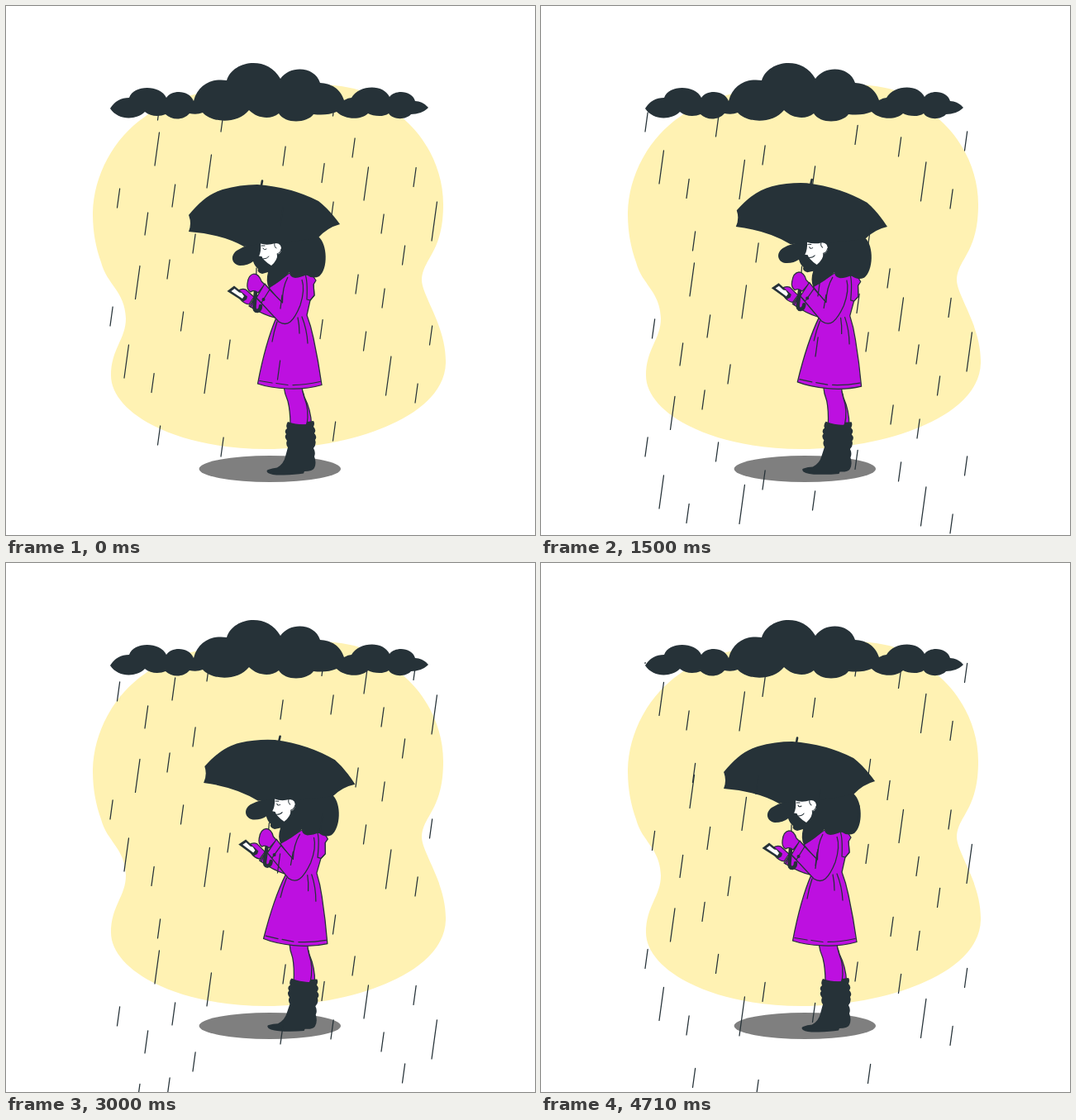
Write an HTML page that moves like this. It is 640 by 640 pixels and loops after 4780 ms.

```html
<!DOCTYPE html>
<html lang="en">
<head>
<meta charset="utf-8">
<title>Rainy day</title>
<style>
  html, body { margin: 0; width: 100%; height: 100%; overflow: hidden; background: #fff; }
  svg { display: block; width: 100vw; height: 100vh; }
  .ink { fill: #263238; }
  .line { fill: none; stroke: #263238; stroke-width: 1.25; stroke-linecap: round; stroke-linejoin: round; }
  .coat { fill: #bd10e0; stroke: #263238; stroke-width: 1.25; stroke-linejoin: round; }
  .skin { fill: #fff; }
</style>
</head>
<body>
<svg viewBox="0 0 640 640">
  <defs>
    <clipPath id="sky"><rect y="120" width="640" height="520"/></clipPath>
    <path id="drops" class="line"/>
  </defs>

  <path fill="#fff2b3" d="M105 250C106 205 130 160 168 134C200 108 250 101 300 97C350 92 400 93 428 102C450 110 466 122 478 134C510 160 529 200 529 240C529 300 503 306 503 332C504 352 533 388 532 432C530 500 410 536 315 536C205 536 127 492 127 447C127 415 145 403 145 378C144 345 122 337 115 310C108 290 105 272 105 250Z"/>
  <ellipse cx="319.300" cy="560" rx="85.700" ry="16" fill="#7f7f7f"/>

  <g id="walker">
    <!-- legs and boots -->
    <path class="coat" d="M354 458Q359 464 361 473Q369 489 369.500 506L358 506Z"/>
    <path class="coat" d="M336 460Q337 469 341 478Q344 490 344 507L364 507Q367 488 361 474Q358 466 358 459Z"/>
    <path class="ink" d="M341 503Q353 507 363 506L364 503L372 502Q374 505 372 509Q376 513 373 517Q377 521 374 525Q376 530 372 535Q375 540 373 545Q376 553 373 559Q371 563 361 563L360 565.500Q350 567 336 567.500Q322 568 317 565Q314 562 317 561Q322 559 328 558.500Q336 554 338 545L341 534Q338 530 340 526Q336 521 339 518Q336 514 340 511Q338 507 341 503Z"/>

    <!-- far arm and phone -->
    <path class="coat" d="M303 350L331 366L325 377Q312 374 294 363Z"/>
    <path class="line" d="M300 355L296 364"/>
    <path class="coat" d="M280 345Q285 341 290 343L300 352L294 361Q287 360 283 354L287 349Z"/>
    <path class="ink" d="M267.500 345L276 338.500L292 351.500L291 355L287 357.500Z"/>
    <path class="skin" d="M272.500 345L276.500 342L282 346.500L285 347L288 351L286 354Z"/>
    <path class="line" stroke-width="3" d="M303 317Q303 326 302 330"/>

    <!-- coat -->
    <path class="coat" d="M343 323L318 341L333 359L327 377C318 398 310 428 304.500 457Q319 462 341 463Q363 464 382 458.500Q378 430 372 402Q369 387 364 374L368 356L373 350L372 336L374 332L371 325L355 321Z"/>
    <path class="line" d="M307 453.500L322 456M327 456.500L341 458.500M347 458.500Q362 458.500 380 454.500M328 382Q324 394 322 406M353 377Q355 386 355 396M358 376Q364 391 365 408"/>
    <path class="coat" d="M362 325Q365 332 364 355L368 356L373 350L372 337L375 332L370 325Z"/>
    <path class="coat" d="M341 328Q334 341 334.500 359L313 337L303 353L330 382Q338 387 344 382Q350 377 356 362Q362 343 358 331"/>
    <path class="line" d="M334 350L332 366"/>

    <!-- near hand and handle -->
    <path class="line" style="stroke-width:4.500" d="M302 345L300.500 363Q300 369 304 369Q308 368 308 363"/>
    <path class="coat" d="M292 336Q293 325 300 324Q306 324 309 333L313 337L305 347Q300 343 296 346Q291 343 292 336Z"/>
    <path class="coat" d="M313 336L303 353L309 359L319 343Z"/>
    <circle class="ink" cx="311.500" cy="355" r="2"/>

    <!-- hair and umbrella -->
    <path class="ink" d="M310 286Q291 288 279 296C270 303 274 313 283 314Q293 314 299 309Q301 315 305 318Q303 322 310 324L317 322Q314 333 318 341Q332 334 343 322Q343 328 350 329Q358 328 363 325Q371 331 379 327C390 318 389 288 378 279L330 278Z"/>
    <path class="ink" d="M221 253C234 237 246 227 262 222Q283 216 304 216Q345 219 378 236Q391 246 404 264Q389 268 378 280L332 288L308 288L288 291Q261 276 221 273Q225 263 221 253Z"/>
    <path class="line" style="stroke-width:2.600" d="M309 217L310 211.500"/>

    <!-- face -->
    <path class="skin" d="M308 287.500Q316 290 326 287Q334 287 333 296Q331 301 328 300Q329 307 321 314Q317 312 312 307Q310 305 309.500 303L306 302.500Q309 297 308 287.500Z"/>
    <path class="line" style="stroke-width:1" d="M325 287Q324 291 327 293M333 294Q332 299 328 300M311 293Q312 296 315 294M311 306Q316 306 318 303M309 290L313 290"/>
  </g>

  <g clip-path="url(#sky)">
    <g id="rain">
      <use href="#drops"/>
      <use href="#drops" y="-393"/>
      <use href="#drops" y="-762"/>
    </g>
  </g>

  <path class="ink" d="M126 124Q134 111 149 111C154 95 187 95 194 111C200 101 222 101 227 115C232 95 250 87 267 90C274 66 316 59 332 88C344 71 374 73 380 93C393 94 404 99 409 114Q414 111 418 111C426 96 456 93 464 110C471 101 491 102 495 115Q504 115 511 123Q503 131 490 131C484 138 468 138 463 130C456 135 444 133 438 130C430 138 410 138 400 128Q388 133 372 131C364 142 338 143 330 130C320 138 304 136 294 126C280 143 250 142 238 129Q231 132 222 130C214 139 200 138 193 131C186 134 175 134 168 128C158 138 136 139 126 124Z"/>
</svg>

<script>
const LOOP = 4780, STEPS = 67, FALL = 7.52, SWAY = 2;

// Lower ends of the drops as x, y pairs, grouped by drop height.
const drops = {
  23: [335,193, 382,213.5, 419,183, 493,218.5, 454,275, 479.5,313, 134.5,244, 226,299,
       195,330, 126,387, 211.5,393, 268,427, 176,467.5, 328.5,452, 393,260, 332,266,
       423,348, 455,365, 380,402.5, 432.5,417, 512.5,410, 495,480, 395.5,526,
       183.5,531, 260,545],
  27: [201,243, 168,277],
  40: [180,193, 243,220, 433,235, 156.5,354.500, 143,450],
  47: [515,284, 240,468.5, 459.5,471]
};

const $ = id => document.getElementById(id);

let d = "";
for (const [h, p] of Object.entries(drops)) {
  for (let i = 0; i < p.length; i += 2) d += `M${p[i]} ${p[i + 1]}l${h * 0.137} ${-h}`;
}
$("drops").setAttribute("d", d);

function draw(now) {
  const step = Math.floor((now % LOOP) / LOOP * STEPS + 0.05) % STEPS;
  const angle = SWAY * (1 - Math.cos(2 * Math.PI * step / STEPS));
  $("walker").setAttribute("transform", `rotate(${angle} 350 575)`);
  $("rain").setAttribute("transform", `translate(0 ${step * FALL})`);
}

const start = performance.now();
function tick() {
  draw(performance.now() - start);
  requestAnimationFrame(tick);
}
tick();
</script>
</body>
</html>
```
